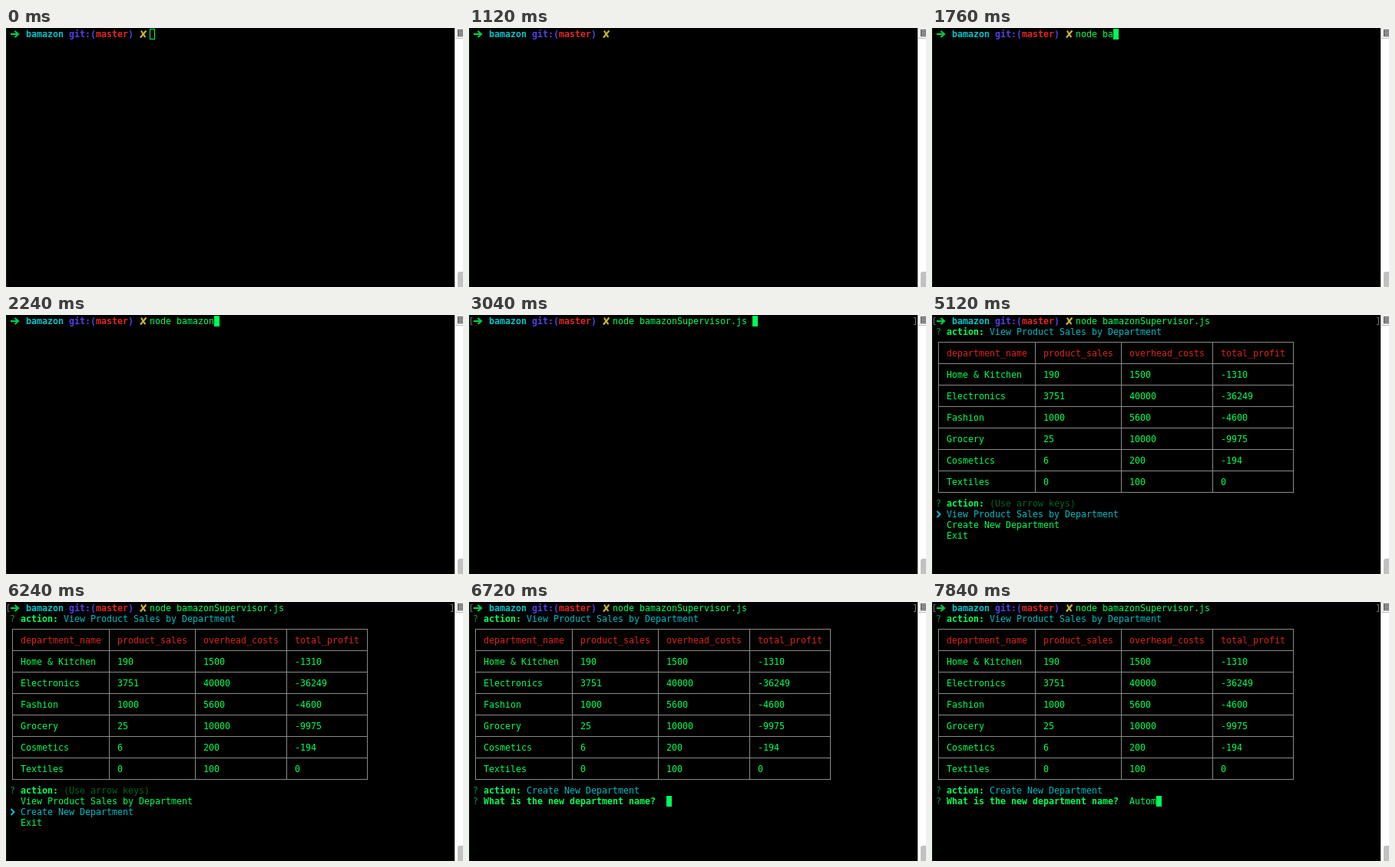
An HTML page with a canvas for the animation above (8 s loop, 595 by 338 pixels).

```html
<!DOCTYPE html>
<html lang="en">
<head>
<meta charset="utf-8">
<title>Terminal session</title>
<style>
html, body { margin: 0; width: 100%; height: 100%; overflow: hidden; background: #000; }
canvas { display: block; }
</style>
</head>
<body>
<canvas id="stage" width="595" height="338"></canvas>
<script>
const ctx = document.getElementById('stage').getContext('2d');
const LOOP = 8000, CELL = 7, ROW = 14, LEFT = 5, TOP = 1;
const FONT = '11.63px "DejaVu Sans Mono", monospace';
const GREEN = '#00ff55', DIM = '#00661f', MARK = '#009a38', CYAN = '#00bcc4', RED = '#dc241e';
const COMMAND = 'node bamazonSupervisor.js ';
const ANSWER = 'Autom';
const ACTIONS = ['View Product Sales by Department', 'Create New Department', 'Exit'];
const TABLE = [
  ['department_name', 'product_sales', 'overhead_costs', 'total_profit'],
  ['Home & Kitchen', 190, 1500, -1310],
  ['Electronics', 3751, 40000, -36249],
  ['Fashion', 1000, 5600, -4600],
  ['Grocery', 25, 10000, -9975],
  ['Cosmetics', 6, 200, -194],
  ['Textiles', 0, 100, 0]
];
// [start time, characters typed]
const COMMAND_KEYS = [[1280, 2], [1440, 3], [1600, 5], [1760, 7], [1920, 9],
  [2080, 10], [2240, 12], [2880, 14], [3040, 26]];
const ANSWER_KEYS = [[7520, 1], [7680, 3], [7840, 5]];

const typed = (keys, t) => keys.reduce((n, [start, count]) => t >= start ? count : n, 0);
const colX = col => LEFT + col * CELL;
const rowY = row => TOP + row * ROW;

function rect(x, y, w, h, color) {
  ctx.fillStyle = color;
  ctx.fillRect(x, y, w, h);
}

function text(col, row, string, color = GREEN, bold = false) {
  ctx.font = (bold ? 'bold ' : '') + FONT;
  ctx.fillStyle = color;
  ctx.fillText(string, colX(col), rowY(row) + 11);
}

function line(points, color, width = 1) {
  ctx.strokeStyle = color;
  ctx.lineWidth = width;
  ctx.stroke(new Path2D(points));
}

function cursor(col, row, focused = true) {
  if (focused) return rect(colX(col), rowY(row), CELL, ROW, GREEN);
  ctx.strokeStyle = GREEN;
  ctx.lineWidth = 1;
  ctx.strokeRect(colX(col) + .5, rowY(row) + .5, CELL - 1, ROW - 1);
}

function pointer(x, y) {
  ctx.save();
  ctx.translate(x, y);
  const shape = new Path2D('M.5 .5V14.5L3.7 11.5L6 17.3L8.3 16.3L6 10.7H10.5Z');
  ctx.fillStyle = '#000';
  ctx.fill(shape);
  ctx.strokeStyle = '#fff';
  ctx.lineWidth = 1;
  ctx.stroke(shape);
  ctx.restore();
}

function frame() {
  rect(0, 0, 595, 338, '#000');
  rect(0, 0, 1, 338, '#0a2a10');
  rect(584, 0, 11, 338, '#fff');
  rect(584, 0, 1, 338, '#d4d4d4');
  rect(585, 0, 10, 13, '#ececec');
  rect(585, 13, 10, 1, '#c4c4c4');
  rect(588, 2, 7, 9, '#555');
  for (const y of [3, 5, 7, 9]) rect(589, y, 6, 1, '#bbb');
  ctx.fillStyle = '#c1c1c1';
  ctx.beginPath();
  ctx.roundRect(588, 318, 10, 24, 3);
  ctx.fill();
}

function prompt() {
  line('M6 8H14', '#00d048', 2.2);
  line('M11.5 4L16 8L11.5 12', '#00d048', 2.2);
  text(3, 0, 'bamazon', '#00c4cc', true);
  text(11, 0, 'git:(', '#5340ea', true);
  text(16, 0, 'master', '#e0281e', true);
  text(22, 0, ')', '#5340ea', true);
  line('M176 3.5Q178 8 181.5 12', '#c6b436', 2);
  line('M182.5 3.5L175 12.5', '#c6b436', 2.2);
}

function question(row, label, reply, color) {
  text(0, row, '?', MARK);
  text(2, row, label, GREEN, true);
  text(10, row, reply, color);
}

function menu(row, selected) {
  question(row, 'action:', '(Use arrow keys)', DIM);
  ACTIONS.forEach((action, i) => text(2, row + 1 + i, action, i === selected ? CYAN : GREEN));
  const y = rowY(row + 1 + selected) + 7;
  line(`M6.5 ${y - 4}L10.5 ${y}L6.5 ${y + 4}`, '#00c4cc', 2);
}

function table() {
  const edges = [8.5, 134.5, 246.5, 365.5, 470.5];
  for (const x of edges) line(`M${x} 35V232`, '#8a8a8a');
  for (let i = 0; i <= TABLE.length; i++) line(`M8 ${35.5 + 28 * i}H471`, '#8a8a8a');
  TABLE.forEach((cells, i) => cells.forEach((cell, j) =>
    text([2, 20, 36, 53][j], 3 + 2 * i, String(cell), i ? GREEN : RED)));
}

function draw(t) {
  frame();
  prompt();
  const count = typed(COMMAND_KEYS, t);
  text(26, 0, COMMAND.slice(0, count));

  if (t >= 3040) {
    line('M4.5 3.5H2.5V12.5H4.5', '#777');
    line('M579 3.5H581.5V12.5H579', '#777');
  }
  if (t < 3360) {
    if (t < 1120 || t >= 1280) cursor(26 + count, 0, t >= 480);
  } else if (t < 3840) {
    cursor(0, 1);
  } else if (t < 5120) {
    menu(1, 0);
  } else {
    question(1, 'action:', ACTIONS[0], CYAN);
    table();
    if (t < 6720) {
      menu(17, t < 6240 ? 0 : 1);
    } else {
      const n = typed(ANSWER_KEYS, t);
      question(17, 'action:', ACTIONS[1], CYAN);
      question(18, 'What is the new department name?', '', CYAN);
      text(36, 18, ANSWER.slice(0, n));
      cursor(36 + n, 18);
    }
  }

  if (t >= 160 && t < 320) pointer(571, 11);
  if (t >= 480 && t < 640) pointer(562, -9);
}

const start = performance.now();
function tick() {
  draw((performance.now() - start) % LOOP);
  requestAnimationFrame(tick);
}
tick();
</script>
</body>
</html>
```
